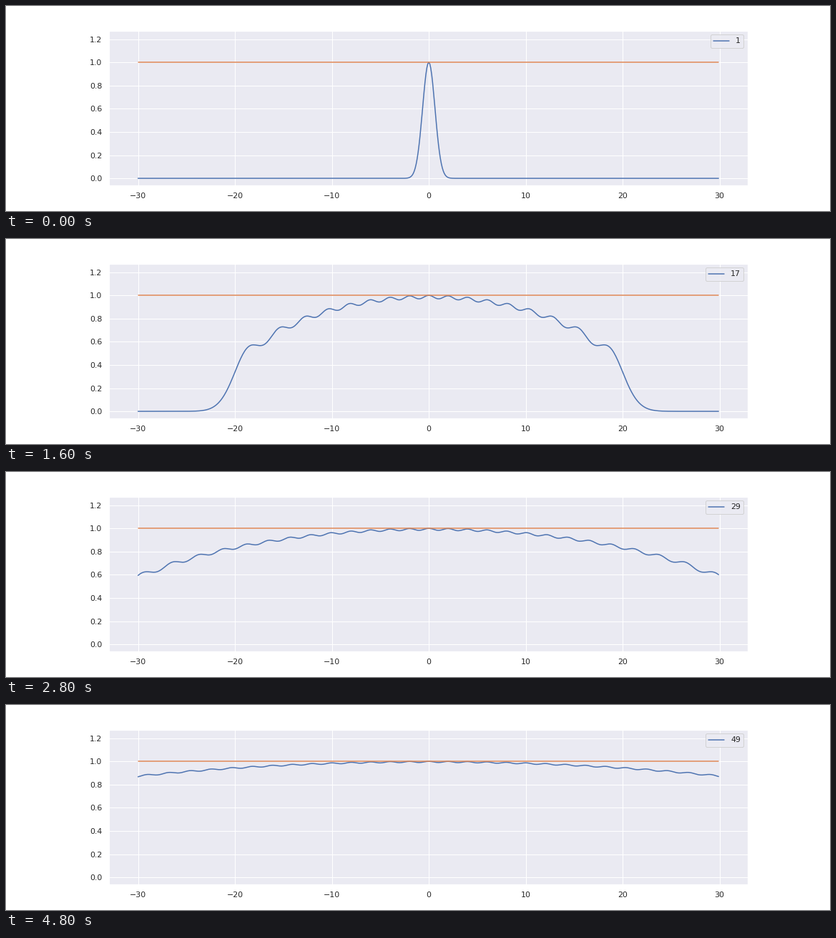
Animation, 1152 px wide and 288 px high, one loop 4.9 s. Source, as a matplotlib script:

```python
import numpy as np
import matplotlib.pyplot as plt
from matplotlib.animation import FuncAnimation

INK = "0.15"
BLUE, ORANGE = "#4C72B0", "#DD8452"
COUNT = 49

plt.rcParams.update({
    "figure.dpi": 72,
    "savefig.dpi": "figure",
    "font.family": "DejaVu Sans",
    "text.color": INK,
    "axes.facecolor": "#EAEAF2",
    "axes.edgecolor": "white",
    "axes.linewidth": 1.25,
    "axes.axisbelow": True,
    "axes.grid": True,
    "grid.color": "white",
    "grid.linewidth": 1,
    "lines.linewidth": 1.5,
    "lines.solid_capstyle": "round",
    "legend.fontsize": 11,
})
for axis in ("xtick", "ytick"):
    plt.rcParams.update({
        f"{axis}.color": INK,
        f"{axis}.labelsize": 11,
        f"{axis}.major.size": 6,
        f"{axis}.major.pad": 3.5,
    })
plt.rcParams.update({"xtick.bottom": False, "ytick.left": False})


def density(u, n):
    """Sum of the first n squared Hermite functions."""
    prev, cur = np.zeros_like(u), np.pi ** -0.25 * np.exp(-u * u / 2)
    total = cur ** 2
    for k in range(1, n):
        prev, cur = cur, np.sqrt(2 / k) * u * cur - np.sqrt((k - 1) / k) * prev
        total = total + cur ** 2
    return total


def profile(n):
    """Density scaled to a bump spacing of 2 and to 1 in the centre."""
    u = x * np.pi / (2 * np.sqrt(2 * n))
    return density(u, n) / density(np.zeros(1), n)


x = np.arange(-30, 30, 0.1)
curves = [profile(n) for n in range(1, COUNT + 1)]
peak = max(c.max() for c in curves)

fig, ax = plt.subplots(figsize=(16, 4), facecolor="white")
fig.subplots_adjust(left=0.125, right=0.9, bottom=0.125, top=0.88)
margin = 0.05 * (x[-1] - x[0])
ax.set_xlim(x[0] - margin, x[-1] + margin)
ax.set_ylim(-0.05 * peak, 1.05 * peak)
ax.set_xticks(range(-30, 31, 10))
ax.set_yticks(np.arange(7) * 0.2)

line, = ax.plot(x, curves[0], color=BLUE)
ax.plot(x, np.ones_like(x), color=ORANGE)


def update(i):
    line.set_ydata(curves[i])
    legend = ax.legend([line], [str(i + 1)], loc="upper right")
    return line, legend


def init():
    return update(0)


anim = FuncAnimation(fig, update, frames=COUNT, init_func=init,
                     interval=100, repeat=True, repeat_delay=0)
plt.show()
```
